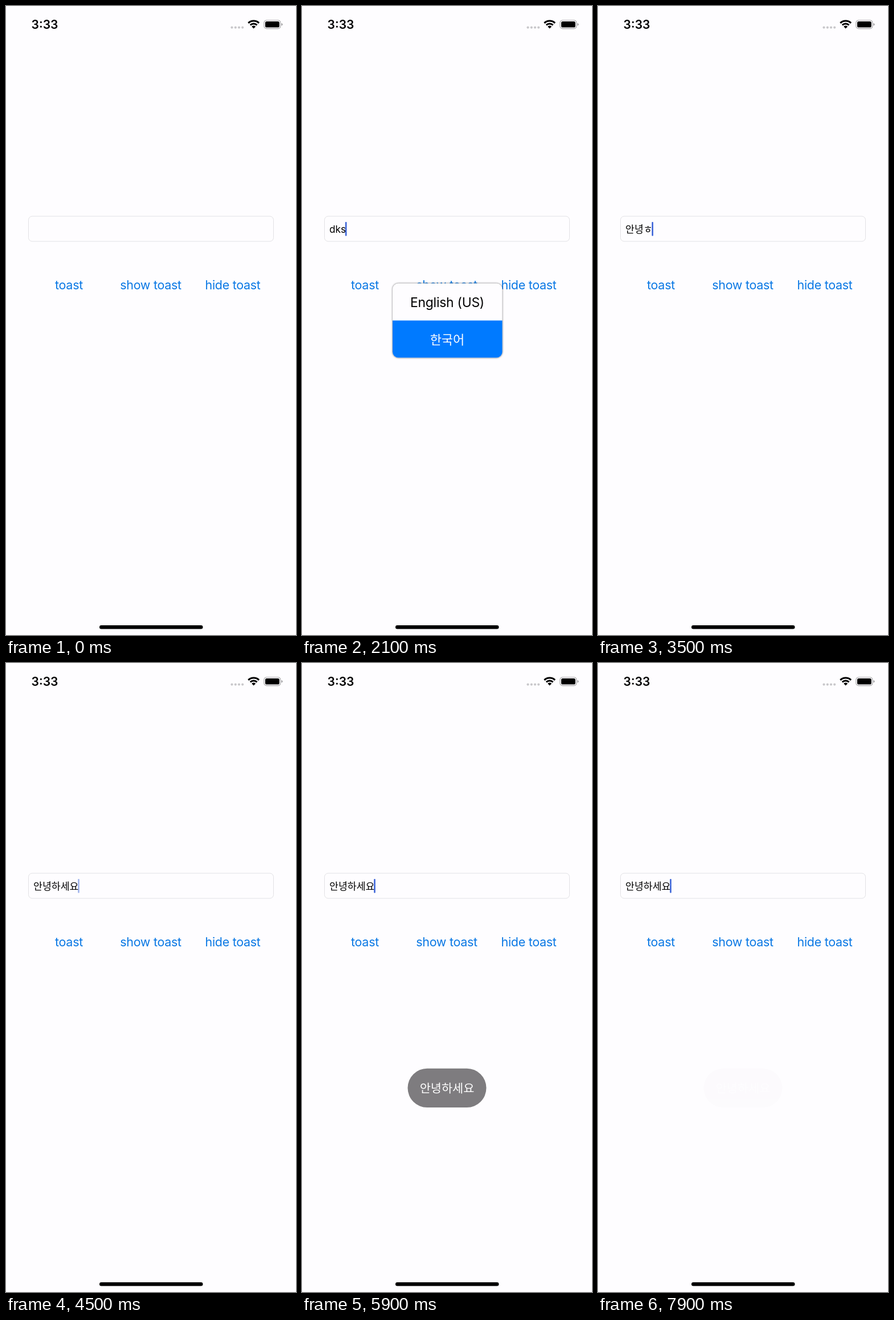
Recreate the animation shown at these times as an HTML page. Size 509 by 1101 pixels, loop 8 s.

```html
<!DOCTYPE html>
<html lang="en">
<head>
<meta charset="utf-8">
<title>Toast demo</title>
<style>
  html, body { margin: 0; width: 100%; height: 100%; overflow: hidden; background: #fefdff; }
  svg { display: block; width: 509px; height: 1101px; }
  text { font-family: Inter, "Noto Sans CJK KR", "Noto Sans CJK", sans-serif; white-space: pre; }
  .mid { text-anchor: middle; }
  .ko { font-family: "Noto Sans CJK KR", "Noto Sans CJK", sans-serif; }
  .buttons { font-size: 21.5px; letter-spacing: -.3px; fill: #0a78e4; }
  .line { fill: none; stroke: #1c1c1e; stroke-width: 1.6; stroke-linecap: round; }
  #menu { filter: drop-shadow(0 2px 9px rgba(0, 0, 0, .2)); }
  #picker { filter: drop-shadow(0 0 1.5px rgba(0, 0, 0, .6)); }
</style>
</head>
<body>
<svg viewBox="0 0 509 1101">
  <!-- status bar -->
  <text class="mid" x="68" y="40" font-size="21" font-weight="600">3:33</text>
  <g fill="#c9c8cb">
    <circle cx="396.5" cy="37.6" r="2.1"/><circle cx="402.8" cy="37.6" r="2.1"/>
    <circle cx="409" cy="37.6" r="2.1"/><circle cx="415.2" cy="37.6" r="2.1"/>
  </g>
  <g transform="translate(434.7 39.6)">
    <path d="M-9.4 -9.8A13.6 13.6 0 0 1 9.4 -9.8M-5.9 -6.2A8.6 8.6 0 0 1 5.9 -6.2" fill="none" stroke="#000" stroke-width="3"/>
    <path d="M0 0L-3.5 -3.6A5 5 0 0 1 3.5 -3.6Z"/>
  </g>
  <rect x="453" y="25" width="28.8" height="14.6" rx="4.4" fill="none" stroke="#a3a2a5" stroke-width="1.2"/>
  <rect x="455" y="27" width="24.8" height="10.6" rx="2.6"/>
  <path d="M483.4 30Q485.6 30.6 485.6 32.3Q485.6 34 483.4 34.6Z" fill="#a3a2a5"/>

  <!-- text field -->
  <rect x="39.5" y="368" width="430" height="44" rx="6.5" fill="none" stroke="#e2e1e5"/>
  <text id="input" x="48" y="396.5" font-size="17.3"></text>
  <rect id="caret" y="378" width="2.6" height="24.5" rx="1" fill="#3d65d8"/>

  <g class="buttons mid">
    <text id="tap" x="110.5" y="496">toast</text>
    <text x="254" y="496">show toast</text>
    <text x="398" y="496">hide toast</text>
  </g>

  <!-- edit menu -->
  <g id="menu">
    <path fill="#f2f1f4" d="M33.5 312H159.5a10 10 0 0 1 10 10V350.5a10 10 0 0 1 -10 10H68Q65 360.5 63 362.7L58 368.5Q56 370.5 54 368.5L49 362.7Q47 360.5 44 360.5H33.5a10 10 0 0 1 -10 -10V322a10 10 0 0 1 10 -10Z"/>
    <path d="M108.7 312V360.5" stroke="#dcdbde"/>
    <text class="mid" x="66" y="342" font-size="18" letter-spacing="-.1" fill="#1c1c1e">Paste</text>
    <path class="line" d="M131 333V331.500a3 3 0 0 1 3 -3H135.500M142.500 328.500H144a3 3 0 0 1 3 3V333M147 340.500V342a3 3 0 0 1 -3 3H142.500M135.500 345H134a3 3 0 0 1 -3 -3V340.500M135 333.200H143M134 336.900H146M135 340.600H142"/>
  </g>

  <!-- keyboard language picker -->
  <g id="picker">
    <rect x="159" y="485.500" width="192.500" height="130" rx="10" fill="#fefdff"/>
    <path d="M159 550.500H351.500V605.500a10 10 0 0 1 -10 10H169a10 10 0 0 1 -10 -10Z" fill="#007aff"/>
    <text class="mid" x="255" y="527" font-size="22.8" letter-spacing="-.2">English (US)</text>
    <text class="mid ko" x="255" y="592" font-size="22" fill="#fff">한국어</text>
  </g>

  <g id="toast">
    <rect x="185.500" y="709.700" width="138" height="68.300" rx="34.150" fill="#7e7c7f"/>
    <text class="mid ko" x="254.500" y="751.600" font-size="20.800" fill="#fff">안녕하세요</text>
  </g>

  <rect x="164" y="1084" width="181.500" height="6.500" rx="3.250"/>
</svg>
<script>
const LOOP = 8000;
const el = id => document.getElementById(id);
const [input, caret, tap, menu, picker, toast] =
  ["input", "caret", "tap", "menu", "picker", "toast"].map(el);

const keys = [
  [0, ""], [1760, "d"], [1860, "dk"], [1960, "dks"],
  [2260, "dk"], [2360, "d"], [2560, ""],
  [2760, "ㅇ"], [2960, "아"], [3060, "안"], [3160, "안ㄴ"], [3260, "안녕"],
  [3460, "안녕ㅎ"], [3560, "안녕하"], [3660, "안녕핫"], [3760, "안녕하세"], [3860, "안녕하세요"]
];

// eased 0 to 1 between two times
function ramp(t, from, to) {
  const p = Math.min(1, Math.max(0, (t - from) / (to - from)));
  return p * p * (3 - 2 * p);
}
const pulse = (t, in0, in1, out0, out1) => ramp(t, in0, in1) - ramp(t, out0, out1);

function caretAlpha(t) {
  if (t < 1000) return pulse(t, 30, 260, 720, 880);
  if (t < 4000) return ramp(t, 1040, 1240);
  const beat = t % 1000;
  return 1 - pulse(beat, 420, 580, 720, 880);
}

function draw(t) {
  const text = keys.findLast(([at]) => at <= t)[1];
  if (input.textContent !== text) input.textContent = text;
  const end = text ? 48 + input.getComputedTextLength() : 49.5;
  caret.setAttribute("x", end - 1.3);

  const fade = (node, alpha) => node.setAttribute("opacity", alpha);
  fade(caret, caretAlpha(t));
  fade(menu, pulse(t, 1530, 1690, 1760, 1900));
  fade(picker, pulse(t, 2040, 2100, 3080, 3290));
  fade(tap, 1 - .7 * pulse(t, 4930, 4990, 5060, 5250));
  fade(toast, pulse(t, 5020, 5540, 7380, 7935));
}

const start = performance.now();
function tick() {
  draw((performance.now() - start) % LOOP);
  requestAnimationFrame(tick);
}
tick();
</script>
</body>
</html>
```
